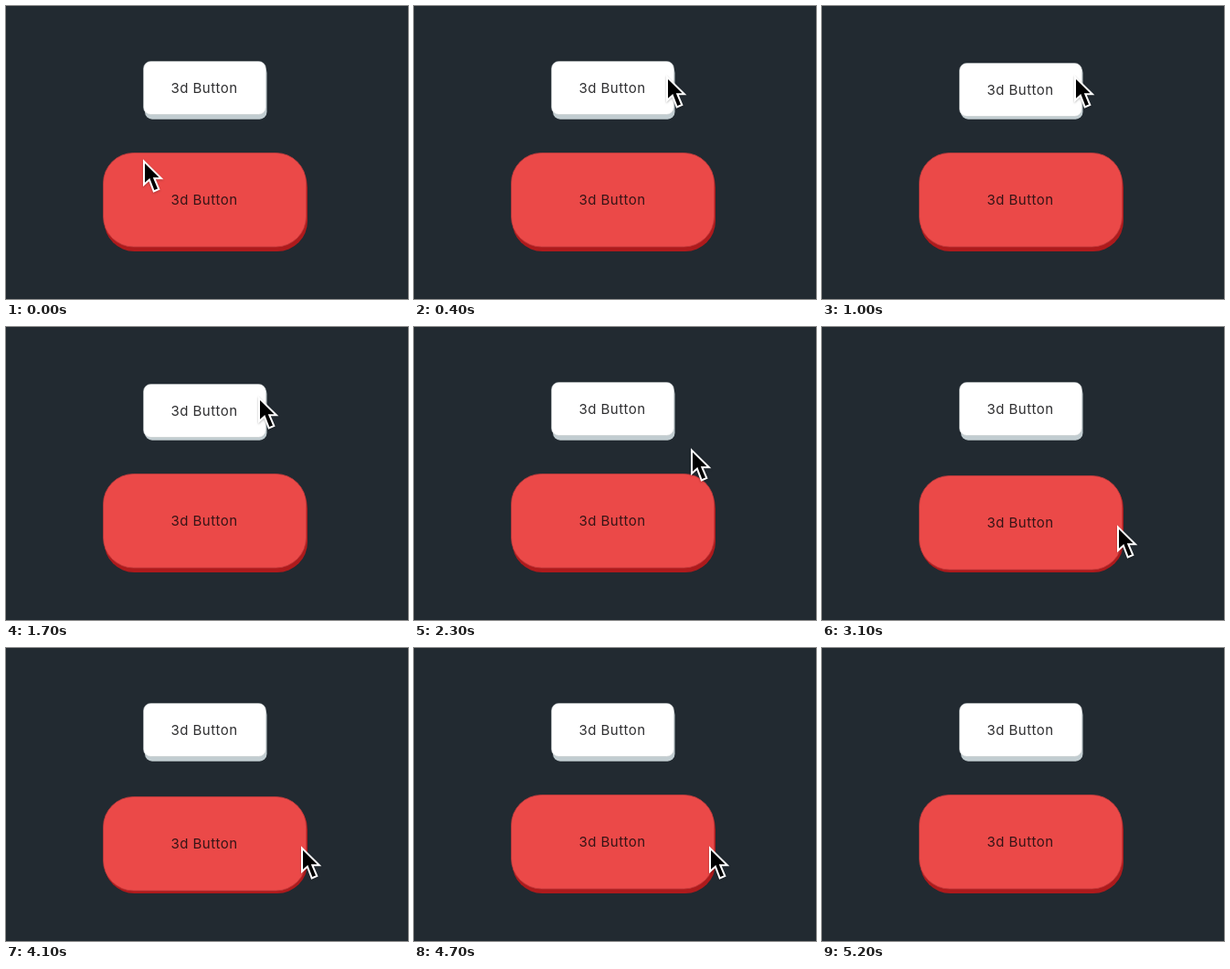
Write an HTML page that moves like this. It is 440x320 px and loops after 6400 ms.

```html
<!DOCTYPE html>
<html lang="en">
<head>
<meta charset="utf-8">
<title>3d Button</title>
<style>
html, body { margin: 0; width: 100%; height: 100%; overflow: hidden; background: #222a31; }
svg { display: block; }
text { font: 15px Inter, sans-serif; letter-spacing: .45px; text-anchor: middle; }
#cursor { filter: drop-shadow(0 1px 1px #0004); }
</style>
</head>
<body>
<svg width="440" height="320" viewBox="0 0 440 320">
  <rect x="152" y="65" width="133.5" height="58.7" rx="8" fill="#c2cdd1"/>
  <g id="white">
    <rect x="150.5" y="60.5" width="134" height="58" rx="8" fill="#fff" stroke="#c4c9cc" stroke-width=".6"/>
    <text x="217" y="94.6" fill="#2e2e30">3d Button</text>
  </g>
  <rect x="107.5" y="165" width="222.5" height="103" rx="33" fill="#ae1a1c"/>
  <g id="red">
    <rect x="106.5" y="160.5" width="222" height="102.5" rx="33" fill="#eb4948" stroke="#c13c3d" stroke-width=".8"/>
    <text x="217" y="216.8" fill="#351416">3d Button</text>
  </g>
  <path id="cursor" d="M2 5V25.8L7.3 21L12.3 34L16 32.4L10.8 20.3H17.5Z"
    fill="#000" stroke="#fff" stroke-width="4" paint-order="stroke"/>
</svg>
<script>
const LOOP = 6400, STEP = 100;
const $ = id => document.getElementById(id);

// Each move continues from the last point: start ms, end ms, x, y
const start = [150, 167];
const moves = [
  [0, 300, 297, 78], [300, 400, 276, 75],
  [2000, 2300, 303, 132], [2300, 2600, 333, 219],
  [2700, 2900, 323, 216], [5000, 5200, 511, -56]
];
const presses = { white: [[700, 1300], [1700, 2100]], red: [[3100, 3500], [4100, 4700]] };

function pointer(t) {
  return moves.reduce(([px, py], [from, to, x, y]) => {
    const k = Math.min(1, Math.max(0, (t - from) / (to - from)));
    return [px + (x - px) * k, py + (y - py) * k];
  }, start);
}

function draw(now) {
  const t = Math.floor(now % LOOP / STEP) * STEP;
  for (const id in presses) {
    const down = presses[id].some(([from, to]) => t >= from && t < to);
    $(id).setAttribute("transform", `translate(0 ${down ? 2 : 0})`);
  }
  $("cursor").setAttribute("transform", `translate(${pointer(t)})`);
  requestAnimationFrame(draw);
}
draw(performance.now());
</script>
</body>
</html>
```
